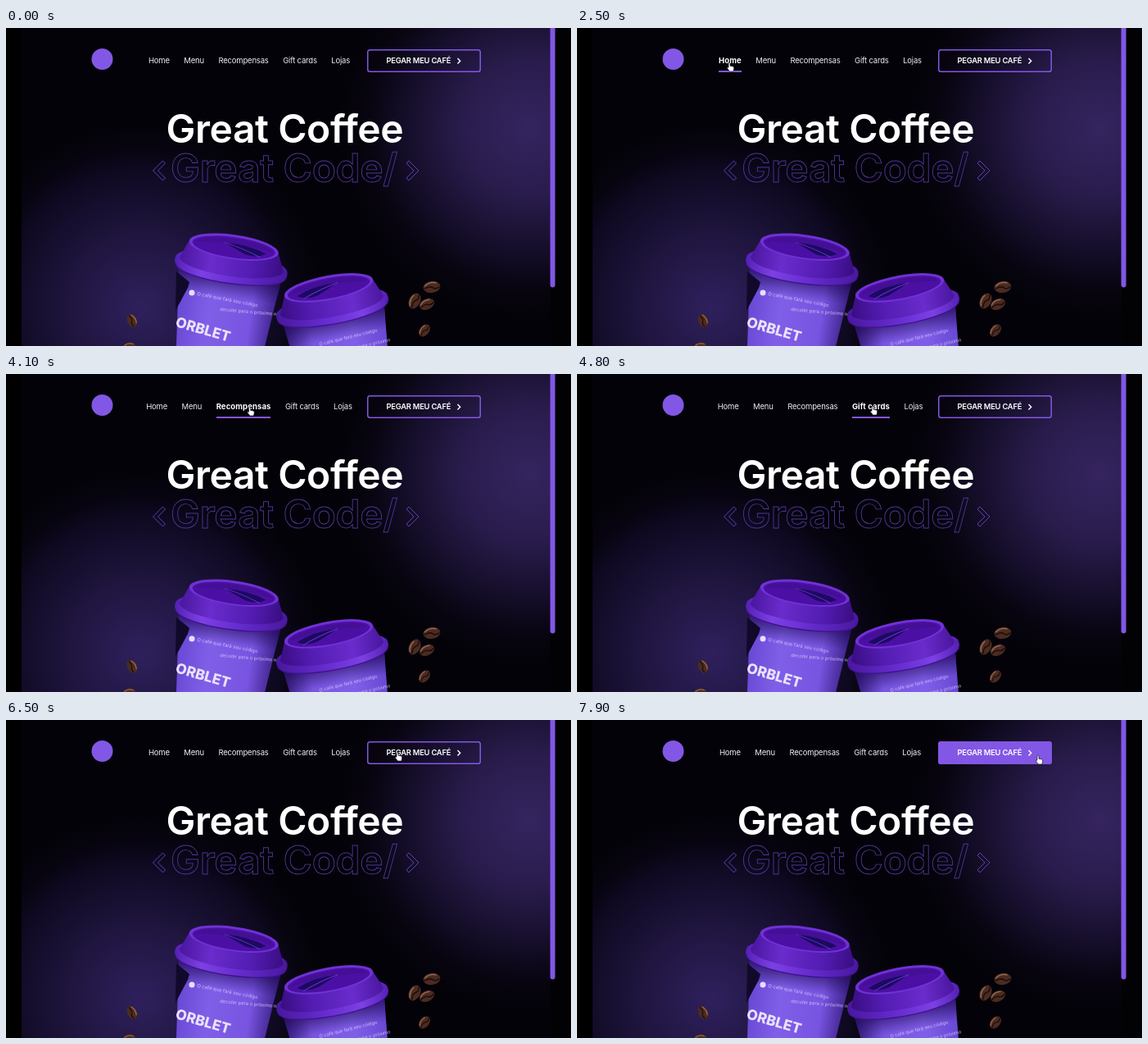
An HTML page that plays this animation: 690x388 px, repeating every 8000 ms.

```html
<!DOCTYPE html>
<html lang="pt-BR">
<head>
<meta charset="utf-8">
<title>Great Coffee</title>
<style>
  html, body { margin: 0; width: 100%; height: 100%; overflow: hidden; background: #000; }
  body { position: relative; font-family: Inter, sans-serif; color: #fff; }
  svg { position: absolute; left: 0; top: 0; }
  nav { position: absolute; left: 97px; top: 26px; width: 400px; display: flex; justify-content: center;
    gap: 17.5px; font-size: 9.5px; line-height: 28px; letter-spacing: -.02em; color: #eeecf3; white-space: nowrap; }
  nav span { position: relative; }
  nav .on { font-weight: 700; letter-spacing: .012em; color: #fff; }
  nav .on::after { content: ""; position: absolute; left: 0; right: 0; top: 25.6px; height: 2.4px; background: #8257e5; }
  #button { position: absolute; left: 441px; top: 26px; width: 138.5px; height: 28px; box-sizing: border-box;
    box-shadow: inset 0 0 0 1.5px #8257e5; border-radius: 3.5px; padding-left: 23.4px;
    font-size: 9.4px; font-weight: 600; line-height: 28px; letter-spacing: -.025em; white-space: nowrap; }
</style>
</head>
<body>
<svg width="690" height="388" viewBox="0 0 690 388">
  <defs>
    <radialGradient id="glowRight" gradientUnits="userSpaceOnUse" cx="638" cy="122" r="235">
      <stop offset="0" stop-color="#35245f"/><stop offset=".35" stop-color="#291c4c"/>
      <stop offset=".7" stop-color="#110b22"/><stop offset="1" stop-color="#05030b" stop-opacity="0"/>
    </radialGradient>
    <radialGradient id="glowLeft" gradientUnits="userSpaceOnUse" cx="165" cy="340" r="225">
      <stop offset="0" stop-color="#2f205d"/><stop offset=".4" stop-color="#1f153e"/>
      <stop offset=".75" stop-color="#0e0920"/><stop offset="1" stop-color="#05030b" stop-opacity="0"/>
    </radialGradient>
    <linearGradient id="rim">
      <stop offset="0" stop-color="#5420b4"/><stop offset=".25" stop-color="#7c40e4"/>
      <stop offset=".6" stop-color="#652bcd"/><stop offset="1" stop-color="#48189f"/>
    </linearGradient>
    <linearGradient id="dome">
      <stop offset="0" stop-color="#4a169f"/><stop offset=".3" stop-color="#6a2ccc"/>
      <stop offset=".7" stop-color="#531cb2"/><stop offset="1" stop-color="#390d82"/>
    </linearGradient>
    <linearGradient id="paper">
      <stop offset="0" stop-color="#6646d2"/><stop offset=".35" stop-color="#805fe8"/>
      <stop offset=".75" stop-color="#7854e0"/><stop offset="1" stop-color="#3c2188"/>
    </linearGradient>
    <linearGradient id="shade" x2="0" y2="1">
      <stop offset="0" stop-color="#1d0852" stop-opacity=".9"/><stop offset=".3" stop-color="#1d0852" stop-opacity="0"/>
    </linearGradient>
    <g id="cup">
      <path id="body" d="M-63 4L-52 110H52L63 4z" fill="url(#paper)"/>
      <path d="M-63 4L-52 110H52L63 4z" fill="url(#shade)"/>
      <path d="M-69-4Q-70 4-66 6A67 15 0 0 0 66 6Q70 4 69-4z" fill="#42128f"/>
      <path d="M-69-5Q-70 1-67 2A67 15 0 0 0 67 2Q70 1 69-5A69 17 0 0 0-69-5" fill="url(#rim)"/>
      <path d="M-55-27L-64-6A64 15 0 0 0 64-6L55-27z" fill="url(#dome)"/>
      <ellipse cy="-27" rx="55" ry="15" fill="#6f32d4"/>
      <ellipse cy="-26.5" rx="51" ry="12.5" fill="#4c0fa4"/>
      <path d="M-47-27A47 10 0 0 1 47-27Q10-34-47-27z" fill="#430f95"/>
      <path d="M-12-31Q18-33 40-24Q30-17 15-20z" fill="#1c0a62"/>
      <path d="M-12-31Q12-27 33-19" fill="none" stroke="#6a32cc"/>
    </g>
    <g id="bean">
      <ellipse rx="10" ry="6.8" fill="#4b2b21"/>
      <path d="M-8-2Q-2-7 6-4" fill="none" stroke="#93654f" stroke-width="1.6"/>
      <path d="M-9 1Q-2-2 1 1T9 1" fill="none" stroke="#1c0e0b" stroke-width="1.5"/>
    </g>
  </defs>

  <rect x="19" width="652" height="388" fill="#040209"/>
  <rect x="19" width="652" height="388" fill="url(#glowLeft)"/>
  <rect x="19" width="652" height="388" fill="url(#glowRight)"/>
  <rect x="665" width="25" height="388" fill="#020104"/>
  <rect x="664.6" y="-4" width="6" height="320.5" rx="3" fill="#8257e5"/>
  <circle cx="117.5" cy="38" r="13" fill="#8257e5"/>

  <g font-size="48" font-weight="600">
    <text x="195.5" y="140" fill="#fff" letter-spacing="-.45">Great Coffee</text>
    <g fill="none" stroke="#4f3795" stroke-width=".9">
      <text x="201" y="188" letter-spacing="-.3">Great Code/</text>
      <path id="angle" stroke="#6a48c2" d="M191.5 162L194.5 165 185.5 174 194.5 183 191.5 186 179.5 174z"/>
      <use href="#angle" transform="matrix(-1 0 0 1 683.5 0)"/>
    </g>
  </g>

  <use href="#bean" transform="translate(154 357) rotate(65) scale(.85)"/>
  <use href="#bean" transform="translate(151 389) scale(.8)"/>
  <use href="#bean" transform="translate(520 316) rotate(-8) scale(1.05)"/>
  <use href="#bean" transform="translate(499 333) rotate(-62)"/>
  <use href="#bean" transform="translate(514 337) rotate(-25) scale(.95)"/>
  <use href="#bean" transform="translate(511 369) rotate(-50) scale(.85)"/>

  <use href="#cup" transform="translate(274.5 294) rotate(8)"/>
  <path d="M208 297L224 310 222 317 207 345z" fill="#110929"/>
  <circle cx="227" cy="323" r="3.5" fill="#e6def9"/>
  <g font-size="5.9" fill="#cbbcf3">
    <text transform="translate(233 326) rotate(11)">O café que fará seu código</text>
    <text transform="translate(261 345) rotate(5)">decolar para o próximo nível</text>
  </g>
  <text transform="translate(206 364) rotate(16)" font-size="17.4" font-weight="800" fill="#e9e2fa">ORBLET</text>

  <use href="#cup" transform="translate(399 343.5) rotate(-10.5) scale(-1 1)"/>
  <g font-size="5.7" fill="#cbbcf3">
    <text transform="translate(383 388) rotate(-14)">O café que fará seu código</text>
    <text transform="translate(409 396) rotate(-13)">decolar para o próximo</text>
  </g>
</svg>

<nav><span>Home</span><span>Menu</span><span>Recompensas</span><span>Gift cards</span><span>Lojas</span></nav>
<div id="button">PEGAR MEU CAFÉ</div>
<svg width="690" height="388" viewBox="0 0 690 388">
  <path d="M551.5 37L554.7 40.2 551.5 43.4" fill="none" stroke="#fff" stroke-width="1.4"/>
  <path id="cursor" fill="#fff" stroke="#17121f" stroke-width=".7"/>
</svg>

<script>
const LOOP = 8000, STEP = 100;
const HAND = "M2.7 0Q4 0 4 1.4V4.2L7.6 5Q9 5.4 8.7 7.3L8 11H3.4L.5 7.3Q0 5.6 1.3 5.9L2 6.4V1Q2 0 2.7 0z";
const ARROW = "M0 0V10L2.5 8 4 11.4 5.5 10.8 4.1 7.5H7.3z";
// Each cursor move: first step, last step, destination x and y
const moves = [
  [800, 1000, 146, 7], [1200, 1500, 122, 31], [2000, 2000, 140, 38], [2200, 2500, 183, 42],
  [2800, 3000, 211, 43], [3200, 3200, 224, 43], [3300, 3400, 232, 43], [3600, 3600, 248, 43],
  [3800, 3900, 281, 40], [4100, 4200, 308, 40], [4500, 4800, 358, 39], [4900, 4900, 363, 40],
  [5200, 5300, 371, 42], [5500, 5900, 404, 41], [6300, 6500, 475, 39], [6600, 7200, 526, 43],
  [7300, 7400, 541, 43], [7800, 7900, 560, 43]
];
// Hover interval of each menu item
const hovers = [[2400, 2900], [3200, 3600], [3800, 4500], [4700, 5600], [5800, 6300]];

const items = [...document.querySelectorAll("nav span")];
const button = document.getElementById("button");
const cursor = document.getElementById("cursor");
const clamp = v => Math.max(0, Math.min(1, v));
const within = (t, [from, to]) => t >= from && t < to;

function cursorAt(t) {
  let x = 165, y = 6;
  for (const [from, to, nextX, nextY] of moves) {
    const k = clamp((t - from + STEP) / (to - from + STEP));
    x += (nextX - x) * k;
    y += (nextY - y) * k;
  }
  return [x, y];
}

function draw(t) {
  const [x, y] = cursorAt(t);
  const hovered = hovers.findIndex(span => within(t, span));
  const overLink = hovered >= 0 || within(t, [1300, 2000]) || t >= 6400;
  items.forEach((item, i) => item.classList.toggle("on", i === hovered));
  button.style.backgroundColor = `rgba(130, 87, 229, ${clamp((t - 6500) / 1000)})`;
  cursor.setAttribute("d", overLink ? HAND : ARROW);
  cursor.setAttribute("transform", `translate(${x} ${y})`);
  cursor.style.display = t < 800 ? "none" : "";
}

function tick() {
  draw(Math.floor(performance.now() % LOOP / STEP) * STEP);
  requestAnimationFrame(tick);
}
tick();
</script>
</body>
</html>
```
